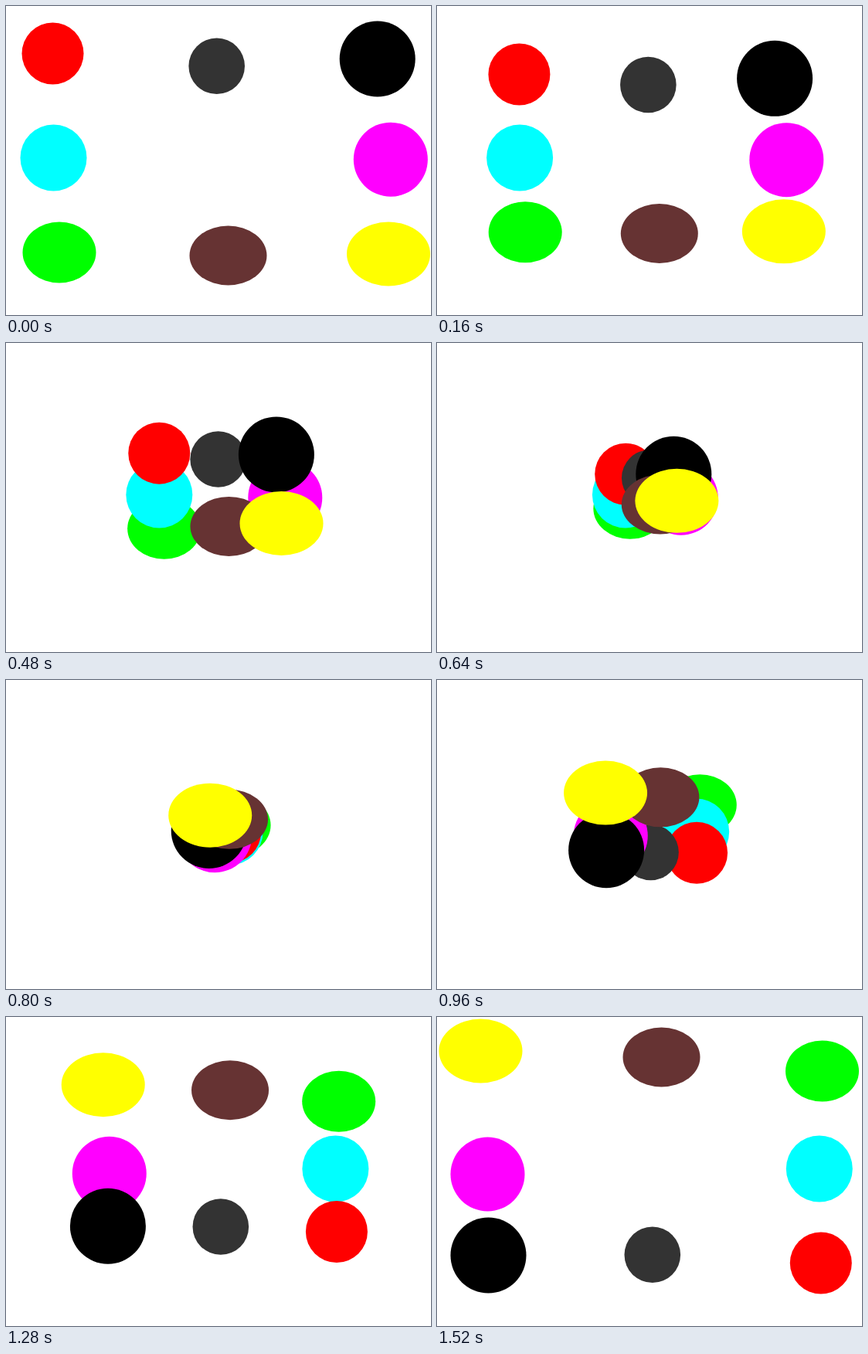
An HTML page for the animation above (1.68 s loop, 550x400 px).

```html
<!DOCTYPE html>
<html lang="en">
<head>
<meta charset="utf-8">
<title>Crossing discs</title>
<style>
  html, body { margin: 0; width: 100%; height: 100%; overflow: hidden; background: #fff; }
  svg { display: block; }
</style>
</head>
<body>
<svg id="stage" width="550" height="400" viewBox="0 0 550 400"></svg>
<script>
const STEP = 80, LAST = 19, LOOP = 1680;

// Back to front: colour, radii, start centre, end centre
const discs = [
  ['#0f0', 47.5, 39.5, 69, 319, 498.5, 70],
  ['#0ff', 43, 43, 61.5, 196.5, 494.8, 196.5],
  ['#f00', 40, 40, 60.5, 61.5, 496.8, 318.5],
  ['#333', 36.3, 36.3, 272.7, 77.8, 278.8, 307.8],
  ['#f0f', 48, 48, 497.8, 198.7, 65.5, 203.5],
  ['#000', 49, 49, 480.7, 68.6, 66.5, 308.6],
  ['#633', 50, 38.5, 287.5, 323, 290.5, 52],
  ['#ff0', 54, 41.5, 495, 321, 56.5, 44]
].map(([fill, rx, ry, x0, y0, x1, y1]) => {
  const el = document.createElementNS('http://www.w3.org/2000/svg', 'ellipse');
  for (const [name, value] of Object.entries({ fill, rx, ry })) el.setAttribute(name, value);
  document.getElementById('stage').append(el);
  return { el, x0, y0, x1, y1 };
});

const mix = (a, b, p) => a + (b - a) * p;

function draw(time) {
  const p = Math.min(LAST, Math.floor((time % LOOP) / STEP)) / LAST;
  for (const d of discs) {
    d.el.setAttribute('cx', mix(d.x0, d.x1, p));
    d.el.setAttribute('cy', mix(d.y0, d.y1, p));
  }
}

const start = performance.now();
function tick() {
  draw(performance.now() - start);
  requestAnimationFrame(tick);
}
tick();
</script>
</body>
</html>
```
